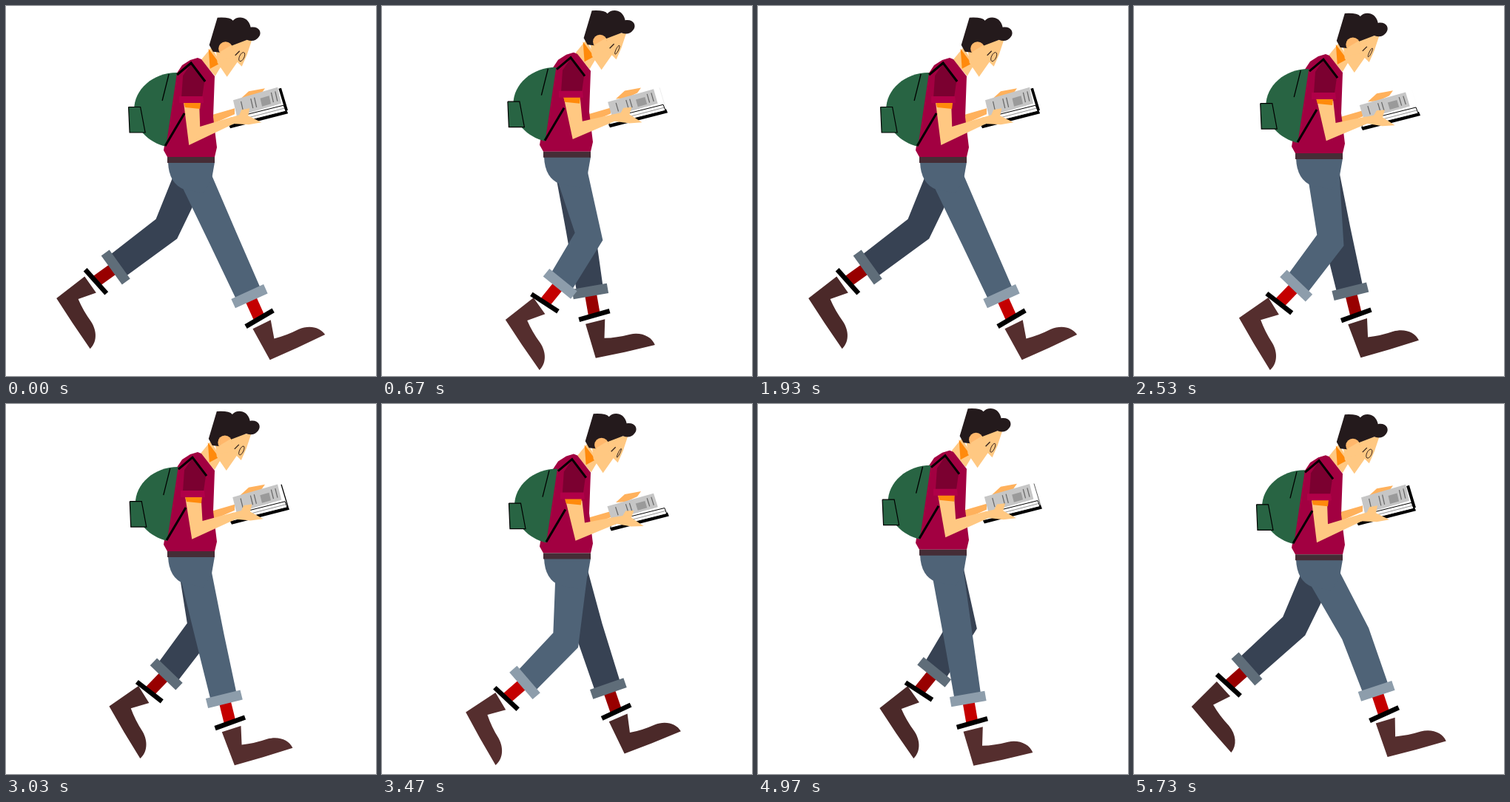
An HTML page with a canvas that plays this animation: 500x500 px, repeating every 5.77 s.

```html
<!DOCTYPE html>
<html>
<head>
<meta charset="utf-8">
<title>Reading walk</title>
<style>
html, body { margin: 0; height: 100%; overflow: hidden; background: #fff; }
canvas { display: block; width: 100vw; height: 100vh; }
</style>
</head>
<body>
<canvas id="stage" width="500" height="500"></canvas>
<script>
const g = document.getElementById('stage').getContext('2d');
const LOOP = 5770, CYCLE = 24, TAU = Math.PI * 2, RAD = Math.PI / 180;
const SKIN = '#ffc882', SHADE = '#ffb15c', ORANGE = '#ff8a0c';
const RED = '#a20041', GREEN = '#286443', BLACK = '#000';

// Joint angles in degrees at eight even steps of the walk; a stride starts at heel contact
const gait = {
  thigh: [24.5, 12.5, 2, -16, -24, 6, 30, 35],
  shin: [24.5, 13, -1, -28, -53, -37, -19, 4],
  foot: [-24, -16, 0, 30, 57, 60, 44, 14]
};

// Cyclic Catmull-Rom through evenly spaced values
function cyclic(values, k) {
  const n = values.length, x = k / CYCLE * n, i = Math.floor(x), u = x - i;
  const [a, b, c, d] = [-1, 0, 1, 2].map(j => values[(i + j + n) % n]);
  return b + u / 2 * (c - a + u * (2 * a - 5 * b + 4 * c - d + u * (3 * (b - c) + d - a)));
}

// The frame on show at time t: steps of 30, 30, 40, 60 and 40 ms after a longer first one
function frameAt(t) {
  if (t < 70) return 0;
  const u = t - 70, r = u % 200;
  return 1 + 5 * Math.floor(u / 200) + [30, 60, 100, 160].filter(x => r >= x).length;
}

function points(list) {
  const p = list.split(' ').map(Number);
  return p.flatMap((x, i) => i % 2 ? [] : [[x, p[i + 1]]]);
}

function trace(pts) {
  g.beginPath();
  pts.forEach(p => g.lineTo(...p));
}

function fill(color, pts) {
  trace(pts);
  g.fillStyle = color;
  g.fill();
}

function line(color, width, pts) {
  trace(pts);
  g.strokeStyle = color;
  g.lineWidth = width;
  g.stroke();
}

const shape = (color, list) => fill(color, points(list));
const stroke = (color, width, list) => line(color, width, points(list));
const bar = (color, length, width) => line(color, width, [[-length / 2, 0], [length / 2, 0]]);

function at(x, y, angle, draw) {
  g.save();
  g.translate(x, y);
  g.rotate(angle);
  draw();
  g.restore();
}

function boot(color, bend) {
  const c = Math.cos(bend), s = Math.sin(bend);
  const toe = (x, y) => [30 + (x - 30) * c + (y - 57) * s, 57 - (x - 30) * s + (y - 57) * c];
  g.beginPath();
  g.moveTo(-14, 9);
  g.lineTo(13, 8);
  g.lineTo(7, 33);
  g.quadraticCurveTo(24, 36, ...toe(42, 35));
  g.bezierCurveTo(...toe(58, 35), ...toe(70, 44), ...toe(72, 56));
  g.lineTo(30, 57);
  g.lineTo(-10, 57);
  g.fillStyle = color;
  g.fill();
}

// A point at a distance below p, with the angle swung forward
const below = ([x, y], angle, d) => [x + d * Math.sin(angle), y + d * Math.cos(angle)];
const beside = ([x, y], angle, d) => [x + d * Math.cos(angle), y - d * Math.sin(angle)];

function leg(hx, hy, k, c) {
  const [thigh, shin, foot] = ['thigh', 'shin', 'foot'].map(j => cyclic(gait[j], k) * RAD);
  const swing = Math.max(0, -Math.sin(TAU * k / CYCLE));
  const cuff = .7 * shin - .3 * foot;
  const hip = [0, 0], knee = below(hip, thigh, 90);
  const hem = below(knee, shin, 86 - 13 * swing), ankle = below(hem, cuff, 33);
  const edge = r => [
    beside(hip, thigh, r * 21.5),
    beside(knee, .35 * thigh + .65 * shin, r * 19.5),
    beside(hem, cuff, r * 18)
  ];
  const toeBend = 28 * RAD * Math.max(0, 1 - Math.abs(k - 9) / 2);
  at(hx, hy, 0, () => {
    line(c.sock, 16, [hem, ankle]);
    fill(c.jeans, [...edge(-1), ...edge(1).reverse()]);
    at(...ankle, foot, () => boot(c.boot, toeBend));
    at(...ankle, -cuff - 6 * RAD, () => bar(BLACK, 43, 6.5));
    at(...hem, -cuff, () => bar(c.cuff, 48, 13.5));
  });
}

function pelvis(color) {
  g.beginPath();
  g.moveTo(219, 211);
  g.lineTo(282, 211);
  g.lineTo(278, 234);
  g.lineTo(267, 253);
  g.lineTo(241, 248);
  g.quadraticCurveTo(220, 240, 219, 211);
  g.fillStyle = color;
  g.fill();
}

function head(sway) {
  shape(SKIN, '264 73 278 56 292 80 283 95');
  shape(ORANGE, '274 58 289 78 276 85');
  shape(SKIN, '284 60 304 50 333 45 326 66 319 82 313 76 299 96 286 77');
  g.beginPath();
  g.moveTo(286, 16);
  g.quadraticCurveTo(303, 15, 307, 20);
  g.bezierCurveTo(313, 13, 328, 14, 331, 29);
  g.bezierCurveTo(342, 27, 347, 36, 342, 42);
  g.quadraticCurveTo(336, 50, 326, 46);
  g.lineTo(305, 54);
  g.lineTo(289, 63);
  g.lineTo(280, 62);
  g.lineTo(275, 53);
  g.fillStyle = '#241a1c';
  g.fill();
  g.beginPath();
  g.arc(297, 58, 9.5, 0, TAU);
  g.fillStyle = '#ffb76b';
  g.fill();
  shape(SKIN, '290 62 305 53 310 70 290 73');
  stroke('#33211c', 1.3, '310 67 316 61');
  g.beginPath();
  g.ellipse(319 + 2 * sway, 69, 3.2 - 2.4 * sway, 6.5, .45, 0, TAU);
  g.strokeStyle = '#33211c';
  g.lineWidth = 1;
  g.stroke();
}

function bag() {
  g.beginPath();
  g.moveTo(231, 90);
  g.bezierCurveTo(198, 90, 173, 113, 173, 140);
  g.bezierCurveTo(173, 166, 192, 184, 216, 190);
  g.fillStyle = GREEN;
  g.fill();
  stroke(BLACK, 1.3, '220 92 211 128');
  const pocket = '165.5 136.5 181.5 136.5 188 171 167 171 165.5 136.5';
  shape(GREEN, pocket);
  stroke(BLACK, 1.2, pocket);
}

function sleeve() {
  shape('#7b0030', '237 123 239 94 250 78 268 102 265 123');
  stroke(BLACK, 3, '231 93 250 77 269 102');
  stroke(BLACK, 3, '215 189 241 145');
  shape(ORANGE, '240 130 263 130 262 139 242 137');
  shape('#b00048', '234 122 266 122 267 131 234 131');
}

function farArm() {
  shape(SHADE, '278 147 309 138 309 146 279 159');
  shape(SHADE, '316 126 328 115 350 111 345 118 330 125');
}

function nearArm(s) {
  const wrist = [306 + 11 * s, 154 + 6 * s], [x, y] = wrist;
  fill(SKIN, [
    [240 + 9 * s, 131], [261 + 11 * s, 133], [262 + 14 * s, 163],
    [x - 1, y - 4], [x + 2, y + 5], [247 + 17 * s, 188 - s]
  ]);
  at(x, y, .16 * s, () => shape(SKIN, '-4 -3 9 -7 12 -14 23 -16 21 -6 39 3 22 6 0 5'));
}

function book(s) {
  at(8 * s, 10.5 * s, 0, () => {
    stroke(BLACK, 4 * (1 - s) ** 4, '370 111 379 141');
    shape(BLACK, '301 161 379 140 381 145 303 165');
    const pages = '303 152 375 134 378 142 302 161 303 152';
    shape('#fff', pages);
    stroke(BLACK, 1, pages);
    stroke('#777', .8, '303 157 376 138');
  });
  const on = (u, v) => [
    307 - 3 * s + u * (60 + 3 * s) + v * (5 + s),
    127 + 16 * s - u * 17.5 + v * (22 - 4 * s)
  ];
  const box = (color, u, v, u2, v2) =>
    fill(color, [on(u, v), on(u2, v), on(u2, v2), on(u, v2)]);
  box('#c6c6c6', 0, 0, 1, 1);
  box('#9a9a9a', .58, .35, .78, .85);
  for (const u of [.16, .38, .46, .84, .93]) line('#666', 1.2, [on(u, .2), on(u, .8)]);
}

const near = { jeans: '#4f6377', cuff: '#8d9dab', sock: '#c40000', boot: '#552e2e' };
const far = { jeans: '#374253', cuff: '#5f6d79', sock: '#980000', boot: '#4b2929' };

function draw(frame) {
  const k = frame % CYCLE;
  const dip = lag => 1 - Math.cos(TAU * (k - lag) / 12);
  const bob = -4.9 * dip(0), nod = -2.4 * dip(1);
  const sway = (1 - Math.cos(TAU * (k + 1) / CYCLE)) / 2;
  g.fillStyle = '#fff';
  g.fillRect(0, 0, 500, 500);
  leg(253.5, 219 + bob, (k + 12) % CYCLE, far);
  leg(256, 232 + bob, k, near);
  at(0, bob, 0, () => {
    pelvis(near.jeans);
    at(0, 11 * sway, 0, farArm);
    at(nod, nod, 0, () => head(sway));
    shape(RED, '230 92 238 80 249 73 259 70 264 72 282 95 280 150 285 191 282 204 218 204 213 195');
    shape('#452d36', '218 204 282 204 282 212 218 212');
    at(7 * sway, 0, 0, bag);
    book(sway);
    nearArm(sway);
    at(8 * sway, 0, 0, sleeve);
  });
}

function tick(now) {
  draw(frameAt(now % LOOP));
  requestAnimationFrame(tick);
}
tick(0);
</script>
</body>
</html>
```
